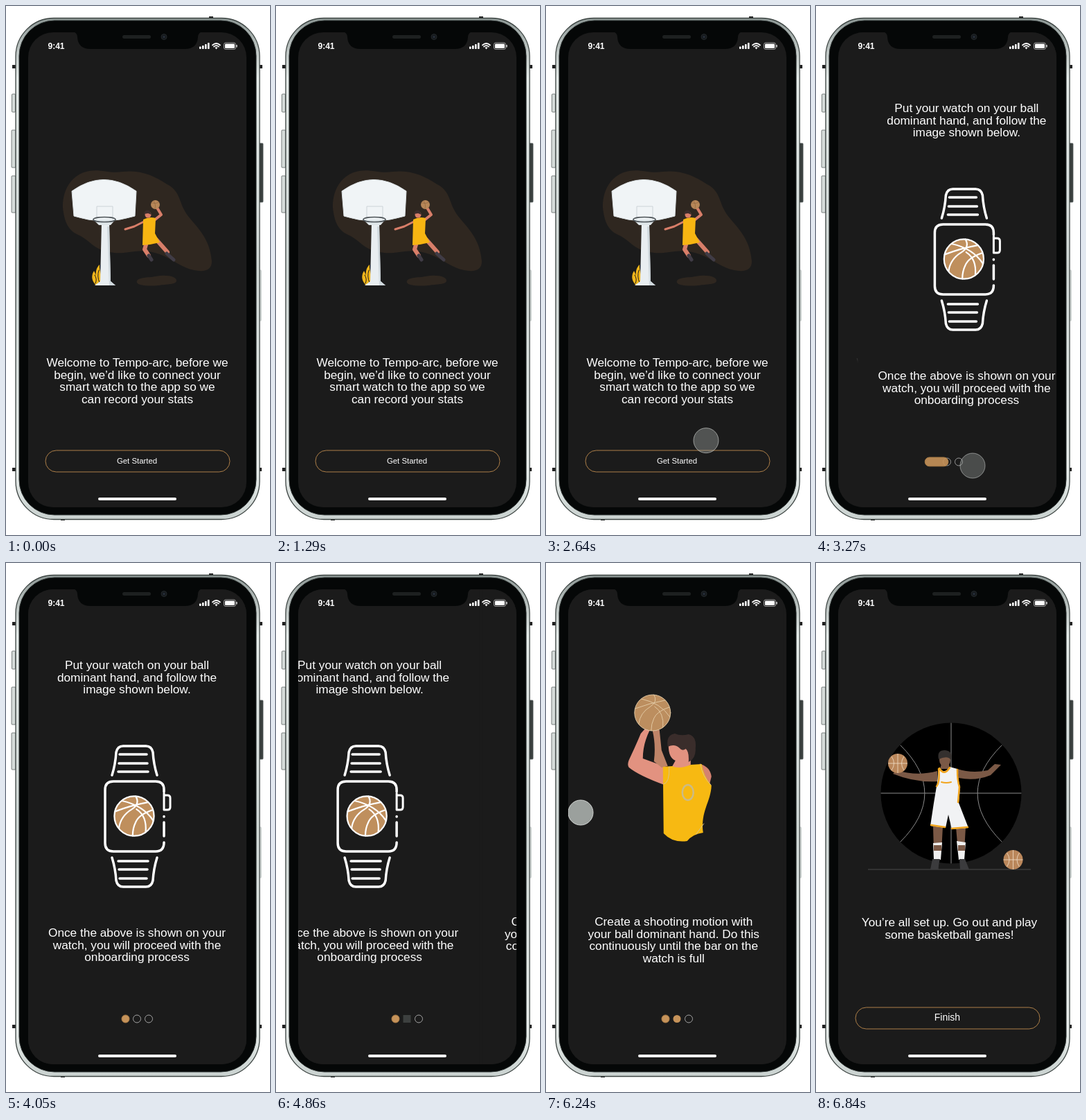
Recreate the animation shown at these times as an HTML page. Size 381x763 px, loop 6.87 s.

```html
<!DOCTYPE html>
<html lang="en">
<head>
<meta charset="utf-8">
<title>Onboarding</title>
<style>
html, body { margin: 0; width: 100%; height: 100%; overflow: hidden; background: #fff; }
svg { display: block; width: 381px; height: 763px; }
text { font-family: "Liberation Sans", Arial, sans-serif; fill: #fff; text-anchor: middle; }
.copy { font-size: 17.25px; }
.line { fill: none; stroke-linecap: round; stroke-linejoin: round; }
</style>
</head>
<body>
<svg viewBox="0 0 381 763">
  <defs>
    <clipPath id="screen"><rect x="32" y="38" width="315" height="685" rx="36"/></clipPath>
    <linearGradient id="metal" x2="0" y2="1">
      <stop offset="0" stop-color="#8e9896"/><stop offset=".12" stop-color="#e6ecea"/>
      <stop offset=".5" stop-color="#cfd7d5"/><stop offset=".9" stop-color="#e9eeec"/>
      <stop offset="1" stop-color="#c9d1cf"/>
    </linearGradient>
    <g id="ball" stroke-linecap="round">
      <circle r="26"/>
      <path fill="none" d="M-25-6Q-4-14 18-18M-16-20Q12-14 25 6M2-26Q8-16-3-9Q-18 0-20 16M24-8Q6-2 2 8Q-2 16-2 26M3-9Q17 0 15 21"/>
    </g>
    <g id="smallBall" stroke="#f1dfc8" stroke-width=".8">
      <circle r="14" fill="#ba875b" stroke="none"/>
      <path fill="none" d="M0-14V14M-14 0H14M-9-10Q-2 0-9 10M9-10Q2 0 9 10"/>
    </g>
  </defs>

  <!-- phone body -->
  <g fill="#d5dbd9" stroke="#5c6462" stroke-width=".8">
    <rect x="8.500" y="127" width="5" height="26" rx="1"/>
    <rect x="8" y="179" width="6" height="54" rx="1"/>
    <rect x="8" y="245" width="6" height="53" rx="1"/>
    <rect x="365" y="198" width="6" height="85" rx="1" fill="#3a403f"/>
    <rect x="365" y="381" width="3.500" height="73" rx="1" stroke="#c6cccb"/>
  </g>
  <g fill="#222">
    <rect x="9" y="85" width="8" height="5"/><rect x="362" y="85" width="8" height="5"/>
    <rect x="9" y="666" width="8" height="5"/><rect x="361" y="666" width="8" height="5"/>
    <rect x="293" y="15" width="6" height="7"/><rect x="79" y="735" width="6" height="7"/>
  </g>
  <rect x="14" y="17.500" width="352" height="723" rx="55" fill="url(#metal)" stroke="#3c4442" stroke-width="1.300"/>
  <rect x="19" y="21" width="342" height="713" rx="51" fill="#050707" stroke="#2b3130"/>

  <g clip-path="url(#screen)">
    <rect x="32" y="38" width="315" height="685" fill="#1b1b1b"/>

    <g id="welcome">
      <path fill="#2f2720" d="M82 291C81 264 96 242 120 238C138 235 149 242 168 239C194 236 215 245 232 257C253 267 249 285 262 302C278 322 294 335 297 368C297 379 290 383 278 382C252 380 240 362 215 356C189 348 175 360 150 355C125 351 122 338 104 330C88 323 84 308 82 291Z"/>
      <path fill="#2f2720" d="M189 399C187 391 205 392 216 390C231 387 246 390 246 396C246 402 232 401 220 403C208 404 192 404 189 399Z"/>
      <path fill="#f4b71b" d="M129 402C122 394 124 387 127 382Q129 386 130 389C129 382 131 377 135 373C134 382 139 387 137 394L134 402Z"/>
      <path class="line" stroke="#1b1b1b" d="M128 388Q132 394 129 400M134 381Q131 390 135 399"/>
      <path fill="#e9eef1" d="M138 311H149L151 397L158 403H128L136 397Z"/>
      <path fill="#cfd8dd" d="M146 318H149L151 397L158 403H149Z"/>
      <path fill="#f0f4f6" stroke="#dbe1e4" d="M95 267Q141 234 188 267L186 303Q141 317 98 303Z"/>
      <path fill="none" stroke="#ccd3d7" d="M131 308V289H154V308"/>
      <path fill="#dfe6e9" d="M126 308H158L151 316H134Z"/>
      <ellipse cx="142" cy="308" rx="16" ry="3.500" fill="none" stroke="#4c5357" stroke-width="1.600"/>
      <g class="line" stroke="#d87e69" stroke-width="4">
        <path d="M201 310L185 318L172 322" stroke-width="3"/>
        <path d="M214 309L224 301L218 291"/>
        <path d="M203 341L200 351L206 360M217 337L233 355" stroke-width="6"/>
      </g>
      <path class="line" stroke="#403c46" stroke-width="5" d="M206 360L210 366M232 357L242 366"/>
      <path fill="#f7b512" d="M198 308Q207 303 216 306L215 328L222 341L208 344L197 345Z"/>
      <circle cx="205" cy="301" r="4.500" fill="#d87e69"/>
      <path fill="#3b2c2b" d="M199 300Q200 293 207 295L210 301L205 299Z"/>
      <circle cx="215.500" cy="286.500" r="6.500" fill="#b78758"/>
      <path class="line" stroke="#8a623e" stroke-width=".6" d="M210 284Q216 286 221 283M213 281Q217 287 215 292"/>
      <g class="copy" data-x="189.500" data-y="520">Welcome to Tempo-arc, before we|begin, we’d like to connect your|smart watch to the app so we|can record your stats</g>
    </g>

    <g id="watch">
      <rect x="32" y="38" width="315" height="685" fill="#1b1b1b"/>
      <g transform="translate(-26)">
        <g class="copy" data-x="215" data-y="153">Put your watch on your ball|dominant hand, and follow the|image shown below.</g>
        <g class="line" stroke="#fff" stroke-width="3.500">
          <path d="M254 330V327Q254 315 242 315H181Q169 315 169 327V404Q169 416 181 416H242Q254 416 254 403M254 374V394M254 365.500V366"/>
          <path d="M254 335H259Q263 335 263 339V352Q263 356 259 356H254V332" stroke-width="3"/>
          <path id="strap" d="M179 306Q184 290 185 273Q187 264 195 264H228Q236 264 238 273Q239 290 244 306M190 276H229M189 289H230M188 301H231"/>
          <use href="#strap" transform="matrix(1 0 0 -1 0 731)"/>
        </g>
        <use href="#ball" transform="translate(211 365) scale(1.1)" fill="#bf8f5d" stroke="#fff" stroke-width="2"/>
        <g class="copy" data-x="215" data-y="539">Once the above is shown on your|watch, you will proceed with the|onboarding process</g>
      </g>
    </g>

    <g id="shoot">
      <rect x="32" y="38" width="315" height="685" fill="#1b1b1b"/>
      <g transform="translate(3)">
        <path fill="#e29280" d="M146 237L151 241Q141 261 141 282L174 294L172 320Q136 307 121 295Q118 291 121 284Q131 263 138 246Z"/>
        <path fill="#bf8468" d="M155 242Q160 236 165 241L168 270L177 293L168 295L157 286Q160 263 155 242Z"/>
        <path fill="#e29280" d="M178 263L199 259L210 278V291Q197 300 183 294L188 285Q178 281 178 263Z"/>
        <path fill="#d48270" d="M224 290Q238 294 240 308L237 320L224 302Z"/>
        <path fill="#3a2d2b" d="M177 265Q174 248 187 246Q196 250 207 247Q219 250 217 267Q218 282 207 287Q208 272 203 268Q198 272 194 267Q187 260 177 265Z"/>
        <path fill="#f7b912" d="M170 294L183 293Q194 298 210 291L226 290Q228 306 240 321C239 345 224 358 228 389Q213 391 205 401Q184 404 171 390Z"/>
        <path class="line" stroke="#d9c38a" d="M179 294Q180 317 171 319M224 290Q227 308 239 320M218 391L229 376"/>
        <ellipse cx="206" cy="331" rx="8" ry="11" fill="none" stroke="#cbbb87" stroke-width="2.500"/>
        <use href="#ball" x="155" y="216" fill="#bc8e5f" stroke="#e5cda9" stroke-width=".9"/>
        <g class="copy" data-x="185.500" data-y="523">Create a shooting motion with|your ball dominant hand. Do this|continuously until the bar on the|watch is full</g>
      </g>
    </g>

    <g id="done">
      <rect x="32" y="38" width="315" height="685" fill="#1b1b1b"/>
      <circle cx="195" cy="332" r="101.500" fill="#000"/>
      <path class="line" stroke="#8d8d8d" d="M195 231V433M94 332H296M122 263Q192 332 122 402M268 263Q198 332 268 402"/>
      <path stroke="#4b4b4b" d="M75 442H310"/>
      <path fill="#7b5946" d="M179 297L181 290H192L193 297ZM175 300L175 315Q143 317 111 304L116 299Q146 308 175 300ZM204 297Q225 304 248 299L258 290L267 291L252 306Q230 315 206 310Z"/>
      <ellipse cx="186" cy="284" rx="8" ry="10" fill="#7b5946"/>
      <path fill="#34302e" d="M177 283Q174 270 186 270Q198 271 195 284Q190 277 177 283Z"/>
      <path fill="#7b5946" d="M169 380H183L181 416H170ZM202 381H216L214 416H205Z"/>
      <path fill="#f0f0f0" d="M169 404L182 403L180 428H170ZM203 401L216 403L214 428H206Z"/>
      <path fill="#7b5946" d="M170 407H181V415H170ZM205 407H215V415H205Z"/>
      <path fill="#3b3b3d" d="M168 427H179Q176 438 177 442H165ZM207 427H215L221 442H208Z"/>
      <path fill="#f1f2f4" d="M178 295Q185 306 193 294L204 297Q205 314 208 323L206 346L220 382L196 384L191 363L187 382L165 379L170 346L174 322Q176 312 176 298Z"/>
      <path class="line" stroke="#f2a51d" stroke-width="2.500" d="M177 297Q179 316 174 322M178 296Q185 308 193 295M204 298Q204 314 207 323L205 345M166 378L186 381M196 383L219 381"/>
      <path class="line" stroke="#f2a51d" stroke-width="2" d="M181 316Q188 318 195 316"/>
      <use href="#smallBall" x="118" y="289"/>
      <use href="#smallBall" x="284.500" y="428"/>
      <g class="copy" data-x="192.500" data-y="524">You’re all set up. Go out and play|some basketball games!</g>
    </g>

    <!-- button that shrinks into the first page dot -->
    <g id="dots">
      <circle cx="206" cy="657.500" r="5.500" fill="none" stroke="#a3a3a3"/>
      <circle id="ring" cx="189" cy="657.500" r="5.500" fill="none" stroke="#a3a3a3"/>
      <rect id="dot" x="183.500" y="652" width="11" height="11"/>
    </g>
    <rect id="button" fill="#c6935a" stroke="#ad7f48"/>
    <text id="start" x="189" y="660" font-size="11.400">Get Started</text>
    <text id="finish" x="189.500" y="660" font-size="14">Finish</text>
    <circle id="touch" r="18" fill="#a3a8a5" stroke="#d0d3d1"/>

    <!-- notch, status bar, home bar -->
    <path fill="#050707" d="M94 36Q103 38 103 45Q104 62 122 62H258Q276 62 277 45Q277 38 286 36Z"/>
    <rect x="133" y="709" width="113" height="4" rx="2" fill="#fff"/>
    <text x="72.500" y="62" font-size="12" font-weight="700">9:41</text>
    <g fill="#fff">
      <rect x="279" y="58.500" width="2.600" height="3.500" rx=".7"/><rect x="283" y="57" width="2.600" height="5" rx=".7"/>
      <rect x="287" y="55" width="2.600" height="7" rx=".7"/><rect x="291" y="53" width="2.600" height="9" rx=".7"/>
      <path d="M301.500 60L303.500 62.500L305.500 60Q303.500 58.500 301.500 60Z"/>
      <rect x="316" y="54.500" width="14" height="6.500" rx="1.200"/><rect x="332.400" y="56" width="1.200" height="3.500" rx=".6"/>
    </g>
    <path class="line" stroke="#fff" stroke-width="1.700" d="M298 56.500Q303.500 51.500 309 56.500M300 58.700Q303.500 55.700 307 58.700"/>
    <rect x="314.500" y="53" width="17" height="9.500" rx="2.500" fill="none" stroke="#bbb" stroke-width=".8"/>
  </g>
  <rect x="168" y="42" width="41" height="5" rx="2.500" fill="#1d2020"/>
  <circle cx="228" cy="44.500" r="4" fill="#15191c" stroke="#24292c"/>
  <circle cx="228" cy="44.500" r="1.500" fill="#28313d"/>
</svg>
<script>
const LOOP = 6870, STEP = 319, SLIDE = 600;
const $ = id => document.getElementById(id);
const clamp = v => Math.min(1, Math.max(0, v));
const mix = (a, b, p) => a + (b - a) * p;
const ramp = (t, from, to) => clamp((t - from) / (to - from));
const slide = (t, start) => 1 - (1 - ramp(t, start, start + SLIDE)) ** 2;
const set = (el, attrs) => { for (const k in attrs) el.setAttribute(k, attrs[k]); };
const shift = (id, x) => set($(id), { transform: `translate(${x})`, visibility: Math.abs(x) < STEP ? 'visible' : 'hidden' });

// Split each caption into centred lines.
document.querySelectorAll('.copy').forEach(g => {
  const { x, y } = g.dataset;
  g.innerHTML = g.textContent.split('|')
    .map((line, i) => `<text x="${x}" y="${+y + i * 17.7}">${line}</text>`).join('');
});

function drawTouch(t) {
  let x = 0, y = 360, alpha = 0;
  if (t > 2400 && t < 3520) {
    const p = ramp(t, 2450, 2830);
    x = mix(236, 226, p);
    y = mix(590, 663, p);
    alpha = .4 * ramp(t, 2400, 2560) * (1 - ramp(t, 3230, 3520));
  } else for (const [from, end] of [[299, 4815], [310, 6240]]) {
    if (t > end - 300 && t < end + 25) {
      x = mix(from, 50, ramp(t, end - 300, end) ** 2);
      alpha = .94 * ramp(t, end - 300, end - 200);
    }
  }
  set($('touch'), { cx: x, cy: y, 'fill-opacity': alpha, 'stroke-opacity': clamp(alpha * 1.6) });
}

function draw(t) {
  const a = slide(t, 2850), b = slide(t, 4808), c = slide(t, 6237);
  shift('watch', STEP * (1 - a - b));
  shift('shoot', STEP * (1 - b - c));
  shift('done', STEP * (1 - c));
  set($('welcome'), { opacity: 1 - a });

  const p = a - c * c, h = mix(31, 11, p);
  set($('button'), {
    x: mix(57, 167, p), y: mix(641, 652, p), width: mix(266, 11, p), height: h,
    rx: h / 2, 'fill-opacity': p
  });
  set($('dots'), { opacity: p });
  set($('ring'), { opacity: b > 0 ? 0 : 1 });
  const tint = ramp(b, .15, 1);
  set($('dot'), {
    opacity: b > 0 ? 1 : 0, rx: 5.5 * ramp(b, .25, .9),
    fill: `rgb(${mix(58, 198, tint)},${mix(62, 147, tint)},${mix(62, 90, tint)})`
  });
  set($('start'), { opacity: clamp(1 - 3 * a) });
  set($('finish'), { opacity: clamp(3 * c - 2) });
  drawTouch(t);
}

const begin = performance.now();
function frame() {
  draw((performance.now() - begin) % LOOP);
  requestAnimationFrame(frame);
}
frame();
</script>
</body>
</html>
```
